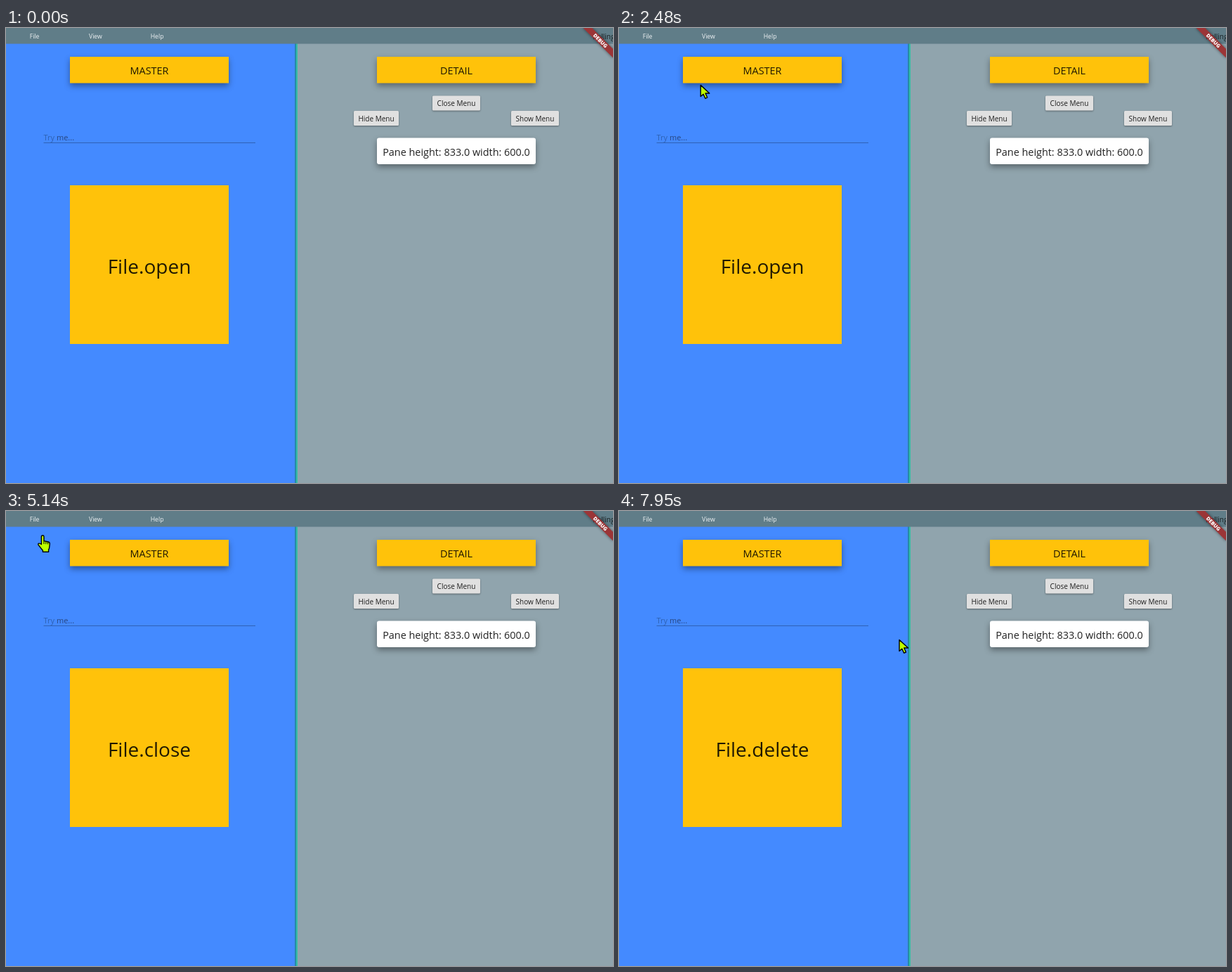
These frames come from a looping animation (864 by 648 pixels, 8000 ms). An HTML page:

```html
<!DOCTYPE html>
<html lang="en">
<head>
<meta charset="utf-8">
<title>Menu demo</title>
<style>
  html, body { margin: 0; height: 100%; overflow: hidden; }
  svg { display: block; width: 100%; height: 100%; font-family: "Open Sans", "Noto Sans", sans-serif; }
  .amber { fill: #ffc20a; }
  .raised { filter: drop-shadow(0 4px 4px rgba(0, 0, 0, .38)); }
  .button { fill: #e0e0e0; filter: drop-shadow(0 1px 1px rgba(0, 0, 0, .4)); }
  .dark { fill: rgba(0, 0, 0, .87); text-anchor: middle; }
  .heading { font-size: 14.4px; }
  .label { font-size: 10px; }
  .big { font-size: 28px; }
  .menu { font-size: 8.7px; fill: #eef2f4; }
  .keys { font-size: 6px; fill: #eef2f4; text-anchor: end; }
  .pointer { fill: #beff00; stroke: #000; stroke-width: 1.4; stroke-linejoin: round; }
</style>
</head>
<body>
<svg viewBox="0 0 864 648">
  <rect width="864" height="648" fill="#90a4ad"/>
  <rect width="412" height="648" fill="#448aff"/>
  <rect x="411" width="2" height="648" fill="#2589a8"/>
  <rect x="413" width="2" height="648" fill="#35bda4"/>

  <rect class="amber raised" x="91" y="41" width="226" height="37.5"/>
  <text class="dark heading" x="204" y="66">MASTER</text>
  <text x="53.5" y="159.5" font-size="11" fill="#2e62b4">Try <tspan fill="#27467f">me...</tspan></text>
  <path d="M53.5 163.5H355" stroke="#2f62b5"/>
  <rect class="amber" x="91" y="224" width="226" height="226"/>
  <text id="action" class="dark big" x="204" y="350"></text>

  <rect class="amber raised" x="528" y="41" width="226" height="37.5"/>
  <text class="dark heading" x="641" y="66">DETAIL</text>
  <g id="buttons"></g>
  <rect class="raised" x="528" y="156.5" width="226" height="37.5" rx="3" fill="#fff"/>
  <text class="dark heading" x="641" y="182">Pane height: 833.0 width: 600.0</text>

  <rect width="864" height="22.5" fill="#607d88"/>
  <g id="fileHover">
    <rect width="84" height="22.5" fill="#43535c"/>
    <circle id="ripple" cx="42" cy="11.5" r="17" fill="#000" opacity=".16" clip-path="inset(5.5px 0 6px)"/>
  </g>
  <g class="menu">
    <text x="33.7" y="15">File</text>
    <text x="118" y="15">View</text>
    <text x="205.7" y="15">Help</text>
  </g>
  <g id="panel">
    <rect y="22.5" width="125" height="90" fill="#455a64"/>
    <rect id="rowHover" width="125" height="22.5" fill="#34454c"/>
    <path d="M10.5 30.5H7.5V37.5H14.5V34.5M9.8 35.2L14.2 30.8M11.8 30.5H14.5V33.2" fill="none" stroke="#fff" stroke-width="1.2"/>
    <g id="rows"></g>
  </g>

  <text x="835" y="16" font-size="10" fill="rgba(0,0,0,.8)">Rolling</text>
  <g transform="translate(864 0) rotate(45)">
    <rect x="-30" y="21" width="60" height="9" fill="#9b3537" style="filter: drop-shadow(0 0 2px rgba(0,0,0,.5))"/>
    <text y="28.2" font-size="7.3" font-weight="800" fill="#fff" text-anchor="middle">DEBUG</text>
  </g>

  <g id="pointer" class="pointer">
    <circle id="press" cx="7" r="13.5" fill="#b4aa14" opacity=".88" stroke="none"/>
    <path id="arrow" d="M1 1.4V17.6L4.8 14.2 7.6 20.3 10.5 19 7.8 13H13.6Z"/>
    <g id="hand">
      <path d="M5.4 13.5V2.5A1.8 1.8 0 0 1 9 2.5V8.6L15.2 10Q17.5 10.6 17.3 13L16.6 18.5Q16.3 20.2 15.6 21V24.3H7.4V22.2Q4.6 19 1.1 14.4 .3 12.8 1.7 12.2 3.2 11.7 5.4 13.5Z"/>
      <path d="M9 8.6V13M11.9 9.3V13.2M14.6 9.9V13.4" fill="none" stroke-width="1"/>
    </g>
  </g>
</svg>
<script>
const LOOP = 8000;
const $ = id => document.getElementById(id);
const show = (id, visible) => $(id).style.display = visible ? "" : "none";
const within = (t, ...spans) => spans.some(([from, to]) => t >= from && t < to);

// Pointer moves, sampled in a few even steps; the pointer rests between legs.
const legs = [
  { start: 600, end: 1690, steps: 8, from: [794, 615], to: [176, 173], shape: "arrow" },
  { start: 1690, end: 2650, steps: 7, from: [176, 173], to: [93, 46], shape: "arrow" },
  { start: 2800, end: 3110, steps: 3, from: [56, 19], to: [39, 13], shape: "hand" },
  { start: 3740, end: 4060, steps: 3, from: [43, 27], to: [49, 53], shape: "hand" },
  { start: 5140, end: 5450, steps: 3, from: [45, 34], to: [36, 13], shape: "hand" },
  { start: 5940, end: 6410, steps: 4, from: [37, 19], to: [43, 99], shape: "hand" },
  { start: 7340, end: 7950, steps: 5, from: [105, 112], to: [398, 182], shape: "arrow" },
];

function pointerAt(t) {
  const leg = legs.findLast(l => t >= l.start);
  if (!leg) return null;
  const last = leg.steps - 1;
  const step = Math.min(last, Math.floor((t - leg.start) / (leg.end - leg.start) * last + 0.05));
  const eased = 1 - (1 - step / last) ** 1.2;
  const [x, y] = leg.from.map((v, i) => v + (leg.to[i] - v) * eased);
  return { x, y, shape: leg.shape };
}

const button = (text, x, y, width) => `
  <rect class="button" x="${x}" y="${y}" width="${width}" height="21" rx="1.5"/>
  <text class="dark label" x="${x + width / 2}" y="${y + 14.7}">${text}</text>`;
$("buttons").innerHTML = button("Close Menu", 607, 96.5, 68)
  + button("Hide Menu", 495, 118, 64) + button("Show Menu", 719, 118, 68);

const items = [["Open", "Ctrl+o"], ["Close", ""], ["Save", ""], ["Delete", "Alt+d"]];
$("rows").innerHTML = items.map(([name, keys], i) => `
  <text class="menu" x="22.5" y="${38 + i * 22.5}">${name}</text>
  <text class="keys" x="119" y="${37 + i * 22.5}">${keys}</text>`).join("");

function draw(t) {
  const pointer = pointerAt(t);
  const menuOpen = within(t, [3420, 4840], [5620, 6860]);
  const row = pointer?.shape === "hand" ? Math.floor(pointer.y / 22.5) : -1;

  $("action").textContent = "File." + (t < 4840 ? "open" : t < 6860 ? "close" : "delete");
  show("panel", menuOpen);
  show("rowHover", row > 0);
  $("rowHover").setAttribute("y", row * 22.5);
  show("fileHover", row === 0);
  show("ripple", menuOpen);

  show("pointer", pointer);
  if (!pointer) return;
  $("pointer").setAttribute("transform", `translate(${pointer.x} ${pointer.y})`);
  show("arrow", pointer.shape === "arrow");
  show("hand", pointer.shape === "hand");
  show("press", within(t, [4690, 4840], [6710, 6860]));
}

const began = performance.now();
function tick() {
  draw((performance.now() - began) % LOOP);
  requestAnimationFrame(tick);
}
tick();
</script>
</body>
</html>
```
